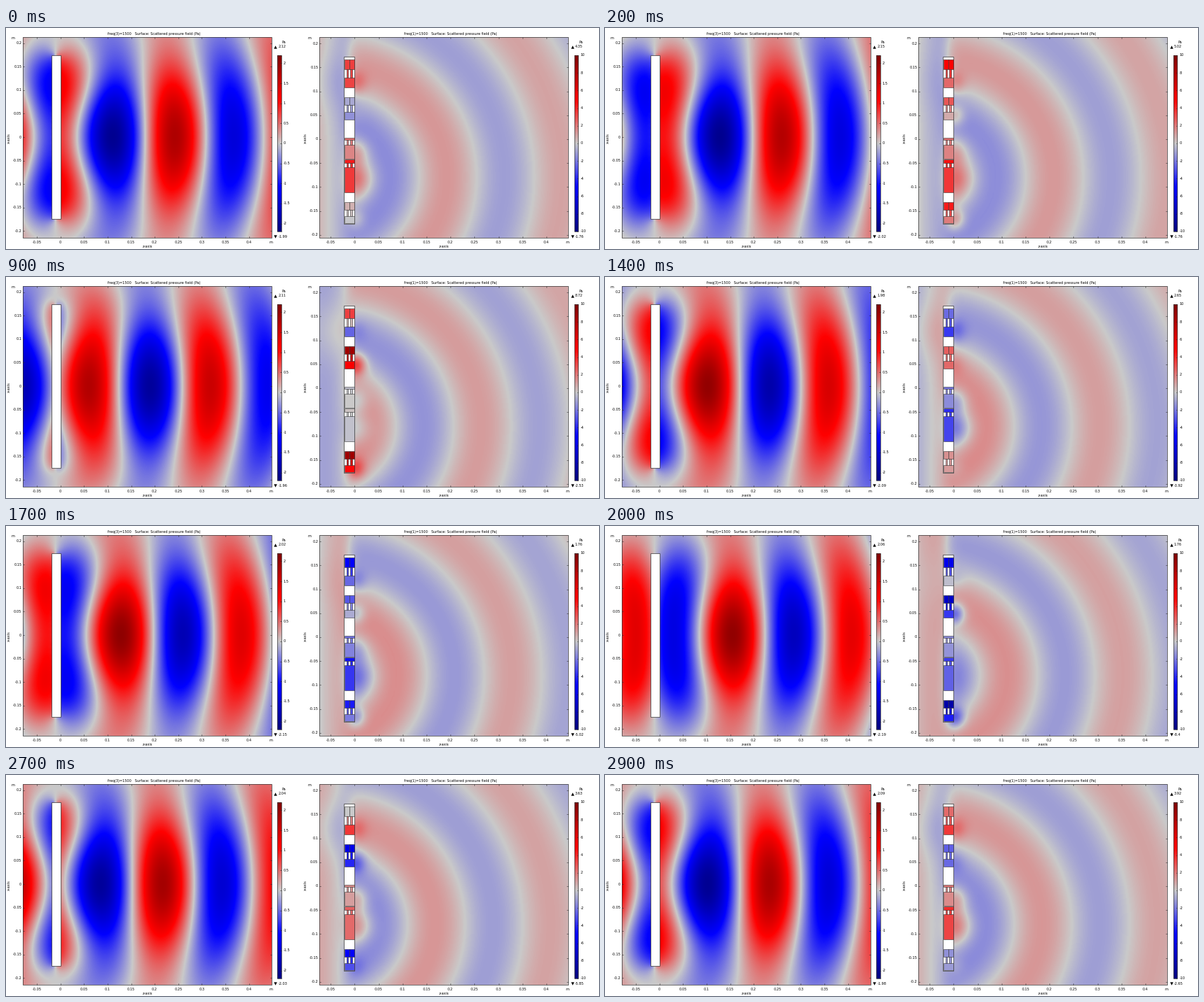
A matplotlib script that plays this animation: 846 by 316 pixels, repeating every 3 s.

```python
import numpy as np
import matplotlib.pyplot as plt
from matplotlib.animation import FuncAnimation
from matplotlib.colors import LinearSegmentedColormap
from matplotlib.patches import Rectangle

W, H, DPI = 846, 316, 100
FRAMES, STEP = 30, 100
PERIOD = FRAMES * STEP
OMEGA = 2 * np.pi / PERIOD
K = 2 * np.pi * 1500 / 343
INK = "#303030"

plt.rcParams.update({"font.family": "DejaVu Sans", "font.size": 5 * 72 / DPI,
                     "text.color": "black", "text.hinting": "force_autohint"})
WAVE = LinearSegmentedColormap.from_list(
    "wave", [(0, 0, .5), (0, 0, 1), (.79, .79, .79), (1, 0, 0), (.5, 0, 0)], 512)

fig = plt.figure(figsize=(W / DPI, H / DPI), dpi=DPI, facecolor="white")
ax = fig.add_axes([0, 0, 1, 1])


def phasor(amp, peak):
    """Complex amplitude of a signal that peaks at the given time in ms."""
    return amp * np.exp(1j * OMEGA * peak)


def at(field, t):
    return np.real(field * np.exp(-1j * OMEGA * t))


def line(xs, ys):
    ax.plot(xs, ys, color=INK, lw=.4, zorder=4)


def box(x0, y0, x1, y1, face, z, lw=.5):
    patch = Rectangle((x0, y0), x1 - x0, y1 - y0, fc=face, ec=INK, lw=lw, zorder=z)
    return ax.add_patch(patch)


class Panel:
    """One plot: frame, ticks, colour bar and min/max labels, in pixels."""

    top, bottom = 13.2, 300.2

    def __init__(self, left, right, origin, scale):
        self.left, self.right = left, right
        self.origin, self.scale = origin, scale

    def px(self, z, x):
        return self.origin[0] + z * self.scale, self.origin[1] - x * self.scale

    def grid(self, step=3):
        def centres(a, b):
            n = round((b - a) / step)
            return a + (np.arange(n) + .5) * (b - a) / n
        col, row = np.meshgrid(centres(self.left, self.right),
                               centres(self.top, self.bottom))
        return (col - self.origin[0]) / self.scale, (self.origin[1] - row) / self.scale

    def draw(self, field, limit, title, title_x):
        self.field = field
        self.image = ax.imshow(at(field, 0), cmap=WAVE, vmin=-limit, vmax=limit,
                               extent=(self.left, self.right, self.bottom, self.top),
                               aspect="auto", interpolation="bilinear", zorder=1)
        box(self.left, self.top, self.right, self.bottom, "none", 4)
        for v in np.arange(-1, 9) * .05:
            c = self.px(v, 0)[0]
            line([c, c], [self.bottom, self.bottom - 2])
            line([c, c], [self.top, self.top + 2])
            ax.text(c, 307, f"{v:.2g}", ha="center", va="center")
        for v in np.arange(-4, 5) * .05:
            r = self.px(0, v)[1]
            line([self.left, self.left + 2], [r, r])
            line([self.right, self.right - 2], [r, r])
            ax.text(self.left - 2, r, f"{v:.2g}", ha="right", va="center")
        mid = (self.left + self.right) / 2
        ax.text(title_x, 8.3, title, ha="center", va="center")
        ax.text(mid, 312.5, "z-axis", ha="center", va="center")
        ax.text(self.left - 20, 158, "x-axis", rotation=90, ha="center", va="center")
        ax.text(self.left - 14, 15, "m", ha="center", va="center")
        ax.text(self.right - 1.5, 307, "m", ha="center", va="center")

    def colorbar(self, x0, ticks, per_unit):
        x1 = x0 + 5.5
        ramp = np.linspace(1, -1, 256)[:, None]
        ax.imshow(ramp, cmap=WAVE, vmin=-1, vmax=1, extent=(x0, x1, 291, 39),
                  aspect="auto", zorder=1)
        box(x0, 39, x1, 291, "none", 4)
        for v in ticks:
            r = 165 - v * per_unit
            line([x1, x1 - 1.5], [r, r])
            ax.text(x1 + 3.5, r, f"{v:g}", va="center")
        ax.text(x1 + 4, 20, "Pa", ha="center", va="center")
        for marker, r in (("^", 27), ("v", 298)):
            ax.plot([x0 - 3.2], [r], marker, ms=3.2, mew=0, color="black")
        self.hi = ax.text(x0 + 1.3, 27, "", va="center")
        self.lo = ax.text(x0 + 1.3, 298, "", va="center")

    def update(self, t, peak):
        self.image.set_data(at(self.field, t))
        self.hi.set_text(f"{round(peak(t), 2):g}")
        self.lo.set_text(f"{-round(peak(t + PERIOD / 2), 2):g}")


# Rigid square plate: a sheet of dipoles solved for uniform face velocity

PLATE_HALF, PLATE_MID, CELLS_HALF = .175, -.01, 14


def dipole(dist, r):
    R = np.sqrt(r**2 + dist**2)
    return (1j * K - 1 / R) * np.exp(1j * K * R) / R * dist / R


def plate_field(z, x):
    half = (np.arange(CELLS_HALF) + .5) * PLATE_HALF / CELLS_HALF
    sx, sy = (g.ravel() for g in np.meshgrid(half, half))
    face, h, slope = -PLATE_MID, 1e-4, 0
    for mx in (-1, 1):
        for my in (-1, 1):
            r = np.hypot(sx[:, None] - mx * sx, sy[:, None] - my * sy)
            slope = slope + (dipole(face + h, r) - dipole(face - h, r)) / (2 * h)
    weights = np.linalg.solve(slope, np.ones(len(sx), complex))

    def total(z, x):
        return sum(w * dipole(z - PLATE_MID, np.hypot(x - m * a, b))
                   for w, a, b in zip(weights, sx, sy) for m in (-1, 1))

    return total(z, x) * (-2.05 / total(.11, 0.))


# Resonator panel: each unit is a cavity, a pair of necks and an open mouth

# top, cavity, neck, mouth heights in pixels; cavity and mouth phasors
UNITS = [
    (44.5, 14.5, 12, 13.5, phasor(5.8, 450), phasor(3.7, 2790)),
    (98.5, 11.5, 10, 10.5, phasor(8.85, 795), phasor(5.2, 880)),
    (157, 3, 6.5, 20.5, phasor(2.3, 100), phasor(1.8, 150)),
    (187.5, 5.5, 5.5, 36, phasor(4.63, 167), phasor(3.7, 120)),
    (249, 11, 9, 10, phasor(9.38, 720), phasor(5, 760)),
]
LEFT, CENTRE, RIGHT = 483, 490, 496.7


def array_field(panel, z, x):
    wavelength, speed = .24, .24 / PERIOD

    def wave(z, x):
        # circular front from a virtual centre behind the panel
        r = np.hypot(z + .044, x + .08)
        return phasor(.72 / np.sqrt(r + .1), (r - .239) / speed)

    front = wave(z, x)
    for y, cavity, neck, mouth, _, p in UNITS:
        x0 = (panel.origin[1] - y - cavity - neck - mouth / 2) / panel.scale
        size = .015 + .4 * mouth / panel.scale
        glow = np.exp(-(z**2 + (x - x0)**2) / size**2)
        front = front + (.8 * p - wave(0, x0)) * glow

    back = phasor(1, 2200 - (z + .05) / speed)
    back = back + phasor(.9, 1100) * np.exp(-((z + .03)**2 + (x - .12)**2) / .06**2)
    side = 1 / (1 + np.exp(-(z + .011) / .008))
    return side * front + (1 - side) * back


def resonators():
    """Patches of all units, each with the phasor that colours it."""
    parts = []
    for y, cavity, neck, mouth, p_in, p_out in UNITS:
        y1, y2 = y + cavity, y + cavity + neck
        split = [LEFT, CENTRE, RIGHT] if cavity > 8 else [LEFT, RIGHT]
        shapes = [(a, y, b, y1, p_in) for a, b in zip(split, split[1:])]
        shapes += [(a, y1, a + 2.6, y2, (p_in + p_out) / 2) for a in (485.6, 491.4)]
        shapes.append((LEFT, y2, RIGHT, y2 + mouth, p_out))
        parts += [(box(*s[:4], "white", 3, .4), s[4]) for s in shapes]
    return parts


TITLE = "freq({})=1500   Surface: Scattered pressure field (Pa)"

plate = Panel(24.3, 379.3, (77.7, 156), 672)
plate.draw(plate_field(*plate.grid()), 2.2, TITLE.format(3), 211)
plate.colorbar(387, np.arange(-4, 5) * .5, 57.3)
box(64.5, 38.7, 77.7, 273, "white", 2)

array = Panel(447.3, 802.3, (497.3, 159), 684)
array.draw(array_field(array, *array.grid()), 10, TITLE.format(1), 634)
array.colorbar(810.7, np.arange(-10, 11, 2), 12.6)
box(482, 41.3, 497.3, 280, "white", 2)
cells = resonators()


def plate_peak(t):
    return np.interp(t % PERIOD, [0, 500, 900, 1400, 2000, 2400, 2900],
                     [2.12, 2.19, 2.11, 1.98, 2.06, 1.96, 2.09], period=PERIOD)


def array_peak(t):
    return max(1.76, *(at(p, t) for _, p in cells))


ax.set_xlim(0, W)
ax.set_ylim(H, 0)
ax.axis("off")


def draw(i):
    t = i * STEP
    plate.update(t, plate_peak)
    array.update(t, array_peak)
    for patch, p in cells:
        patch.set_facecolor(WAVE(.5 + at(p, t) / 20))
    return []


anim = FuncAnimation(fig, draw, frames=FRAMES, interval=STEP, repeat=True,
                     repeat_delay=0, blit=False)
plt.show()
```
